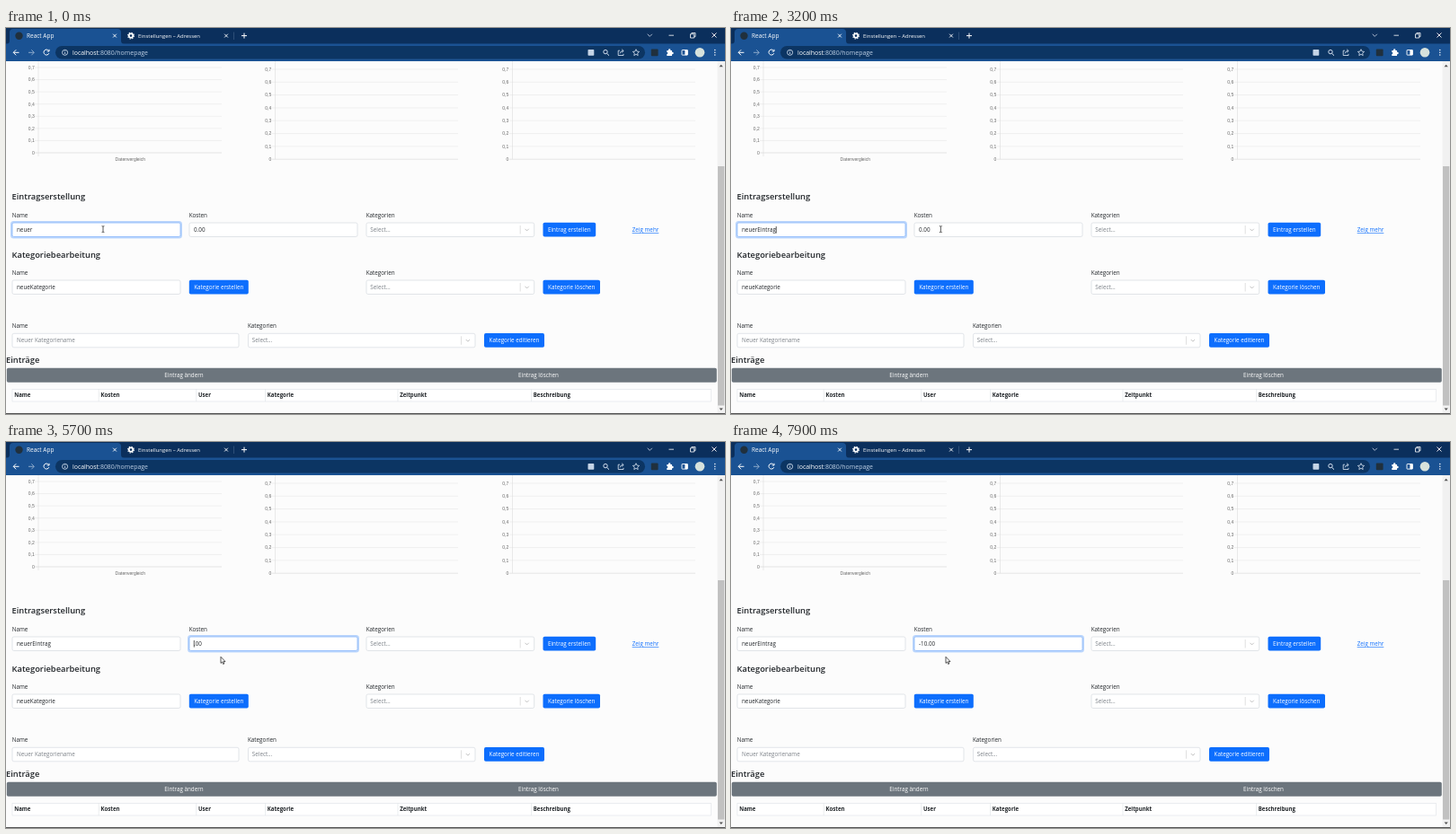
An HTML page that plays this animation: 800x430 px, repeating every 8 s.

```html
<!DOCTYPE html>
<html lang="de">
<head>
<meta charset="utf-8">
<title>React App</title>
<style>
  html, body { margin: 0; width: 100%; height: 100%; overflow: hidden; background: #fcfcfc; }
  svg { display: block; width: 800px; height: 430px; }
  text { font: 6.3px "Open Sans", "Noto Sans", sans-serif; fill: #212529; white-space: pre; }
  .h { font-size: 9.35px; font-weight: 600; }
  .th { font-size: 6.1px; font-weight: 700; }
  .tick { font: 5px "Liberation Sans", Arial, sans-serif; fill: #666; }
  .ph { fill: #7b8087; }
  .btn { fill: #fff; text-anchor: middle; }
  .mid { text-anchor: middle; }
  .end { text-anchor: end; }
  .link { fill: #0d6efd; text-decoration: underline; }
  .tab { fill: #fff; font-size: 6.5px; }
  .tab2 { fill: #fff; font-size: 5.95px; }
  .url { fill: #fff; font-size: 6.95px; }
  .focus { fill: #fff; stroke: #86b7fe; stroke-width: .8; }
  .glow { fill: none; stroke: #0d6efd; stroke-opacity: .27; stroke-width: 1.8; }
</style>
</head>
<body>
<svg id="stage" viewBox="0 0 800 430"></svg>
<script>
const stage = document.getElementById('stage');
const parts = [];
const add = s => parts.push(s);
const rect = (x, y, w, h, fill, r = 0, extra = '') =>
  add(`<rect x="${x}" y="${y}" width="${w}" height="${h}" rx="${r}" fill="${fill}" ${extra}/>`);
const line = (d, stroke, w = 1, extra = '') =>
  add(`<path d="${d}" fill="none" stroke="${stroke}" stroke-width="${w}" ${extra}/>`);
const text = (x, y, s, cls = '', extra = '') =>
  add(`<text x="${x}" y="${y}" class="${cls}" ${extra}>${s}</text>`);
const circle = (x, y, r, fill, extra = '') =>
  add(`<circle cx="${x}" cy="${y}" r="${r}" fill="${fill}" ${extra}/>`);
const cross = (x, y, r) =>
  line(`M${x - r} ${y - r}l${2 * r} ${2 * r}m0 ${-2 * r}l${-2 * r} ${2 * r}`, '#fff', .9);

function browser() {
  const ice = '#e4eefa';
  rect(0, 0, 800, 18, '#0b2f5c');
  rect(0, 17.5, 800, 19.5, '#1a5293');
  add('<path d="M0 18Q4 18 4 14V5Q4 1 8 1H124Q128 1 128 5V14Q128 18 132 18Z" fill="#1a5293"/>');
  circle(14.5, 8.7, 4.2, '#20303d');
  text(23, 11, 'React App', 'tab');
  cross(121, 8.6, 1.9);
  circle(139, 8.6, 2.2, 'none', 'stroke="#fff" stroke-width="1.7"');
  circle(139, 8.6, 3.4, 'none', 'stroke="#fff" stroke-width="1.1" stroke-dasharray="1.4 1.27"');
  text(147, 10.9, 'Einstellungen – Adressen', 'tab2');
  cross(245, 8.6, 1.9);
  line('M253.5 4.5V13', '#45648b', .6);
  line('M262 8.6H268M265 5.6V11.6', '#fff');

  line('M713.7 6.8L716.3 9.4L718.9 6.8', '#d4dfec', .8);
  line('M737.5 8.2H743', '#fff', .8);
  line('M761.5 6.8H765.7V11H761.5ZM762.8 6.5V5.5H767V9.7H766', '#fff', .8);
  cross(788, 8, 2.5);

  line('M14.5 27.3H8.3M11.2 24.3L8.2 27.3L11.2 30.3', '#fff');
  line('M25 27.3H31.2M28.3 24.3L31.3 27.3L28.3 30.3', '#8ba9cb');
  line('M47.4 25.2A3 3 0 1 0 47.8 28.2M48 23.8V26H45.8', '#fff');
  rect(55, 20, 656, 14.5, '#0c3563', 7.2);
  circle(65.6, 27.3, 3, 'none', `stroke="${ice}" stroke-width=".8"`);
  line('M65.6 26.8V29M65.6 25.3V26.1', ice, .8);
  text(74, 29.8, 'localhost<tspan fill="#bfd0e5">:8080/homepage</tspan>', 'url');

  rect(647.5, 24, 6.8, 6.8, '#c5d4e6', .8);
  circle(667, 26.6, 2.2, 'none', `stroke="${ice}" stroke-width=".9"`);
  line('M668.6 28.3L671 30.7', ice);
  line('M683 25.2H681.2V30.5H687V28.8M683.2 28.3Q683.5 25.5 686.8 25.5M685.2 23.8L687.2 25.5L685.2 27.2', ice, .8);
  line('M701 23.7L702.1 26.1L704.6 26.4L702.7 28.1L703.2 30.6L701 29.3L698.8 30.6L699.3 28.1L697.4 26.4L699.9 26.1Z', ice, .75);
  rect(717.8, 23.5, 7.8, 7.8, '#20303d', 1);
  add('<path d="M735.3 25H737V24.5A1.2 1.2 0 0 1 739.4 24.5V25H741V26.8H741.5A1.2 1.2 0 0 1 741.5 29.2H741V31H735.3V29.1A1.1 1.1 0 0 0 735.3 26.9Z" fill="#fff"/>');
  rect(752, 24.5, 6.4, 5.6, 'none', .5, 'stroke="#fff" stroke-width=".9"');
  rect(755.4, 24.5, 3, 5.6, '#fff');
  circle(772, 27.3, 5.3, '#d7e2dc');
  for (const y of [24.6, 27.3, 30]) circle(788.8, y, .75, '#fff');
}

function chart(left, right, top, bottom) {
  const step = (bottom - top) / 7;
  for (let i = 0; i < 8; i++) {
    const y = bottom - i * step;
    line(`M${left - 4} ${y}H${right}`, i ? '#e7e7e7' : '#d5d5d5', .6);
    text(left - 4.2, y + 1.8, i ? '0,' + i : '0', 'tick end');
  }
  line(`M${left} 37V${bottom + (left < 100 ? 4 : 0)}`, '#dcdcdc', .6);
}

const field = (x, y, w, s = '', cls = '') => {
  rect(x, y, w, 15.5, '#fff', 1.8, 'stroke="#ced4da" stroke-width=".6"');
  text(x + 5, y + 10, s, cls);
};
const select = (x, y, w) => {
  field(x, y, w);
  text(x + 4.3, y + 10, 'Select...', 'ph');
  const r = x + w;
  line(`M${r - 15.5} ${y + 3}V${y + 12.5}`, '#ccc', .6);
  line(`M${r - 10.2} ${y + 6.8}l2.1 2.1l2.1-2.1`, '#b9b9b9', .9);
};
const button = (x, y, w, s) => {
  rect(x, y, w, 15.7, '#0d6efd', 1.8);
  text(x + w / 2, y + 10.1, s, 'btn');
};

function page() {
  chart(36, 240, 44, 139);
  text(138.3, 147.8, 'Datenvergleich', 'tick mid');
  chart(299.5, 503, 46, 146.2);
  chart(563.5, 767, 46, 146.2);

  text(6.5, 191, 'Eintragserstellung', 'h');
  text(6.7, 210.8, 'Name');
  text(203.7, 210.8, 'Kosten');
  text(400.7, 210.8, 'Kategorien');
  field(7, 217, 187);
  field(204, 217, 187);
  select(401, 217, 186.7);
  button(597.5, 216.8, 58.7, 'Eintrag erstellen');
  text(696.7, 227, 'Zeig mehr', 'link');

  text(6.5, 255.8, 'Kategoriebearbeitung', 'h');
  text(6.7, 275, 'Name');
  text(400.7, 275, 'Kategorien');
  field(7, 281, 187, 'neueKategorie');
  button(203.8, 280.8, 66, 'Kategorie erstellen');
  select(401, 281, 186.7);
  button(597.5, 280.8, 63.5, 'Kategorie löschen');

  text(6.7, 334.2, 'Name');
  text(269, 334.2, 'Kategorien');
  field(7, 340.3, 252, 'Neuer Kategoriename', 'ph');
  select(269.5, 340.3, 252.5);
  button(532, 340.1, 67, 'Kategorie editieren');

  text(0, 372.6, 'Einträge', 'h');
  rect(.8, 378.8, 790, 16, '#6c757d', 1.8);
  text(198, 389, 'Eintrag ändern', 'btn');
  text(592.5, 389, 'Eintrag löschen', 'btn');

  const cols = [7, 103.2, 211.7, 288.5, 436, 584.5];
  rect(7, 402.3, 777.5, 13.7, '#fff', 0, 'stroke="#dee2e6" stroke-width=".6"');
  ['Name', 'Kosten', 'User', 'Kategorie', 'Zeitpunkt', 'Beschreibung'].forEach((s, i) => {
    if (i) line(`M${cols[i]} 402.3V416`, '#dee2e6', .6);
    text(cols[i] + 2.2, 411.4, s, 'th');
  });

  rect(791.5, 37, 8.5, 392, '#f1f1f1');
  rect(792, 154, 7.3, 266.5, '#c1c1c1');
  add('<path d="M793.6 43.2L795.7 40.8L797.8 43.2ZM793.6 423.6L795.7 426L797.8 423.6Z" fill="#505050"/>');
  rect(0, 429.2, 800, .8, '#2b2b2b');
}

browser();
page();
add('<rect id="glow" class="glow" y="215.9" width="189.2" height="17.7" rx="2.6"/>');
add('<rect id="focus" class="focus" y="217" width="187" height="15.5" rx="1.8"/>');
text(12, 227, '', '', 'id="name"');
text(209, 227, '', '', 'id="cost"');
add('<path id="caret" d="M0 221V228.6" stroke="#111" stroke-width=".7"/>');
add('<path id="beam" d="M-1.4-3.4Q0-3.4 0-2.6Q0-3.4 1.4-3.4M0-2.6V2.8M-1.4 3.6Q0 3.6 0 2.8Q0 3.6 1.4 3.6" fill="none" stroke="#222" stroke-width=".75"/>');
add('<path id="arrow" d="M0 0V7.1L1.6 5.7L2.7 8.2L3.8 7.7L2.8 5.3H5Z" fill="#fff" stroke="#111" stroke-width=".7"/>');
stage.innerHTML = parts.join('');

const el = id => document.getElementById(id);
const [glow, focus, nameText, costText, caret, beam, arrow] =
  ['glow', 'focus', 'name', 'cost', 'caret', 'beam', 'arrow'].map(el);

// [time, value, caret index]
const nameKeys = [[-800, 'neuer', 5], [400, 'neuerE', 6], [600, 'neuerEi', 7], [800, 'neuerEin', 8],
  [1200, 'neuerEint', 9], [1400, 'neuerEintr', 10], [1600, 'neuerEintra', 11], [1800, 'neuerEintrag', 12]];
const costKeys = [[3400, '0.00', 4], [4600, '0.00', 1], [5300, '.00', 0],
  [6200, '-.00', 1], [6800, '-1.00', 2], [7200, '-10.00', 3]];
const BLINK = 530;

const stateAt = (keys, t) => keys.filter(k => k[0] <= t).pop() || keys[0];
const ease = (t, a, b) => {
  const p = Math.min(1, Math.max(0, (t - a) / (b - a)));
  return p * p * (3 - 2 * p);
};
const show = (node, on) => node.setAttribute('visibility', on ? 'visible' : 'hidden');

function draw(t) {
  const onCost = t >= 3400;
  const name = stateAt(nameKeys, t), cost = stateAt(costKeys, t);
  const [since, value, index] = onCost ? cost : name;
  const active = onCost ? costText : nameText;

  active.textContent = value.slice(0, index);
  const x = (onCost ? 209 : 12) + (index ? active.getComputedTextLength() : 0) + .3;
  nameText.textContent = name[1];
  costText.textContent = cost[1];
  caret.setAttribute('transform', `translate(${x} 0)`);
  show(caret, Math.floor((t - since) / BLINK) % 2 === 0);
  focus.setAttribute('x', onCost ? 204 : 7);
  glow.setAttribute('x', onCost ? 202.9 : 5.9);

  const px = 108 + 131 * ease(t, 2500, 3300);
  const py = 224 + 15.3 * ease(t, 3500, 4000);
  const inside = py < 233 && (px < 194 || px > 204);
  for (const p of [beam, arrow]) p.setAttribute('transform', `translate(${px} ${py})`);
  show(beam, inside);
  show(arrow, !inside);
}

function tick() {
  draw(Math.floor(performance.now() % 8000 / 100) * 100);
  requestAnimationFrame(tick);
}
tick();
</script>
</body>
</html>
```
